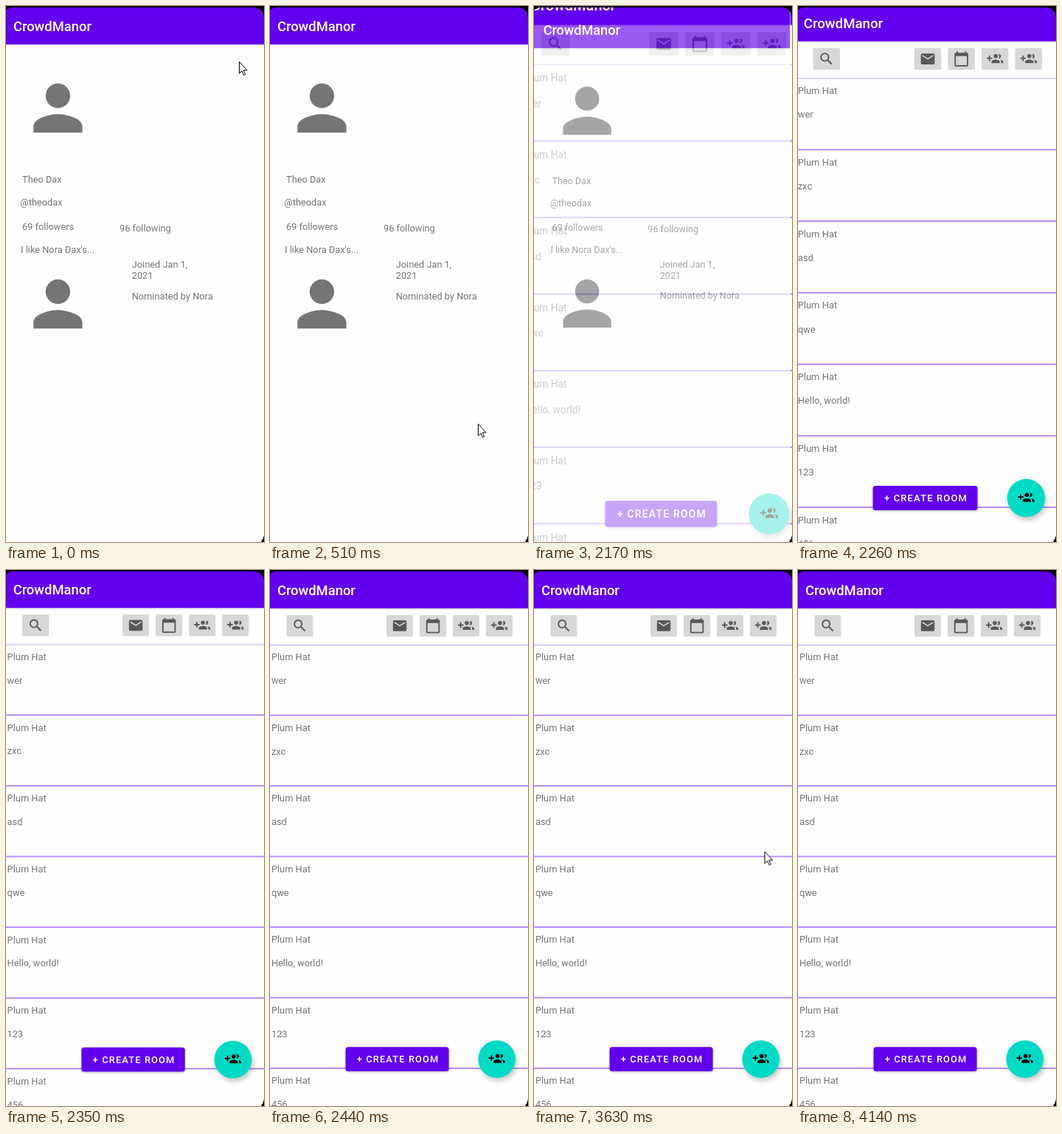
Animation, 350 px wide and 725 px high, one loop 4480 ms. Source, as an HTML page:

```html
<!DOCTYPE html>
<html lang="en">
<head>
<meta charset="utf-8">
<title>CrowdManor</title>
<style>
  html, body { margin: 0; width: 100%; height: 100%; overflow: hidden; background: #fefefe; }
  svg { display: block; }
  #stage { font: 12.8px Roboto, sans-serif; }
  .copy { fill: #757575; }
  .title { font-size: 18.4px; font-weight: 500; fill: #fff; }
  .button { font-weight: 500; letter-spacing: 1.15px; fill: #fff; }
  .screen { transform-origin: 175px 362px; }
  #room { filter: drop-shadow(0 1.5px 1.5px rgba(0, 0, 0, .3)); }
  #fab { filter: drop-shadow(2px 4px 3px rgba(0, 0, 0, .22)); }
</style>
</head>
<body>
<svg id="stage" width="350" height="725" viewBox="0 0 350 725">
  <defs>
    <linearGradient id="shade" x2="0" y2="1">
      <stop stop-opacity=".12"/><stop offset="1" stop-opacity="0"/>
    </linearGradient>
    <path id="person" d="M12 12a4 4 0 1 0 0-8 4 4 0 0 0 0 8zm0 2c-2.67 0-8 1.34-8 4v2h16v-2c0-2.66-5.33-4-8-4z"/>
    <g id="search">
      <circle cx="9.5" cy="9.5" r="5.5" fill="none" stroke="currentColor" stroke-width="2"/>
      <path d="M14 14l5.7 5.7" stroke="currentColor" stroke-width="2.1"/>
    </g>
    <path id="mail" d="M4 4h16a2 2 0 0 1 2 2v12a2 2 0 0 1-2 2H4a2 2 0 0 1-2-2V6a2 2 0 0 1 2-2zm16 4V6l-8 5-8-5v2l8 5z"/>
    <path id="calendar" fill-rule="evenodd" d="M20 3h-1V1h-2v2H7V1H5v2H4a2 2 0 0 0-2 2v16a2 2 0 0 0 2 2h16a2 2 0 0 0 2-2V5a2 2 0 0 0-2-2zm0 18H4V8h16z"/>
    <g id="group">
      <path d="M8 10H5V7H3v3H0v2h3v3h2v-3h3z"/>
      <circle cx="13" cy="8" r="3"/>
      <path d="M17.1 5.1a3 3 0 1 1 0 5.8 5 5 0 0 0 0-5.8z"/>
      <path d="M13 13c-2 0-6 1-6 3v2h12v-2c0-2-4-3-6-3zm6.6.2c.9.7 1.4 1.6 1.4 2.8v2h3v-2c0-1.5-2.4-2.5-4.4-2.8z"/>
    </g>
  </defs>
  <g id="list" class="screen"></g>
  <g id="profile" class="screen"></g>
  <path d="M0 0H350V14Q347 2 336 2H9Q3 2 0 6zM350 716V725H346Q349 721 350 716z"/>
  <path id="cursor" d="M.5.5V16.3L4 13l2.6 5.6 2.2-1L6.3 12h4.9z" fill="#fff" stroke="#000"/>
</svg>
<script>
const LOOP = 4480;
const TICK = 90;
const SWITCH = 2170;
const APP = 'CrowdManor';
const el = id => document.getElementById(id);

const text = (x, y, words, kind = 'copy') => `<text class="${kind}" x="${x}" y="${y}">${words}</text>`;

const icon = (name, cx, cy, scale = .92) =>
  `<use href="#${name}" transform="translate(${cx - 12 * scale} ${cy - 12 * scale}) scale(${scale})"/>`;

// The screens reach past the left and bottom edges of the stage.
const frame = () => `
  <rect x="-12" width="362" height="765" fill="#fefefe"/>
  <rect x="-12" y="52" width="362" height="3" fill="url(#shade)"/>
  <rect x="-12" width="362" height="52" fill="#6200ee"/>
  ${text(10, 34, APP, 'title')}`;

const tool = (name, cx) => `
  <rect x="${cx - 18}" y="61" width="36" height="29" rx="2" fill="#d6d7d7"/>
  <g fill="#585858" color="#585858">${icon(name, cx, 75.5)}</g>`;

const row = (message, i) => {
  const top = 101 + i * 95.45;
  const line = i
    ? `<rect y="${top - .8}" width="350" height="1.9" fill="#b588fb"/>`
    : `<rect y="${top}" width="350" height="1" fill="#c5aaf2"/>`;
  return line + text(2, top + 21.5, 'Plum Hat') + text(2, top + 53.2, message);
};

el('list').innerHTML = frame()
  + tool('search', 40.5)
  + ['mail', 'calendar', 'group', 'group'].map((name, i) => tool(name, 176 + 45 * i)).join('')
  + ['wer', 'zxc', 'asd', 'qwe', 'Hello, world!', '123', '456'].map(row).join('')
  + `<rect id="room" x="102.6" y="645.2" width="140" height="32.6" rx="3.5" fill="#6200ee"/>
     ${text(117.7, 666.3, '+ CREATE ROOM', 'button')}
     <circle id="fab" cx="307.7" cy="661.5" r="25.4" fill="#03dac5"/>${icon('group', 307.7, 661)}`;

el('profile').innerHTML = frame()
  + `<g fill="#757575">${icon('person', 70.4, 138, 4.15)}${icon('person', 70.4, 403, 4.15)}</g>`
  + text(22, 239.3, 'Theo Dax') + text(19.3, 269.7, '@theodax')
  + text(22, 303.2, '69 followers') + text(154, 305.2, '96 following')
  + text(20, 334, "I like Nora Dax's...")
  + text(170.7, 354, 'Joined Jan 1,') + text(170.7, 369, '2021')
  + text(170.7, 397, 'Nominated by Nora');

// Each pose holds until the next one.
function play(id, poses) {
  const keys = poses.map(({ at, ...style }) => ({ ...style, offset: at / LOOP, easing: 'steps(1, end)' }));
  keys.push({ ...keys.at(-1), offset: 1 });
  el(id).animate(keys, { duration: LOOP, iterations: Infinity });
}

// The list settles exponentially from slightly too large.
const settle = [0, 1, 2, 3].map(k => ({
  at: k && SWITCH + k * TICK,
  transform: `scale(${1 + .085 * .16 ** k})`
}));
play('list', settle);

play('profile', [
  { at: 0, opacity: 1, transform: 'none' },
  { at: SWITCH, opacity: .65, transform: 'scale(.984)' },
  { at: SWITCH + TICK, opacity: 0, transform: 'scale(.95)' }
]);

// Eased pointer move, sampled about once per tick; bow bends the path sideways.
function glide(start, end, [x0, y0], [x1, y1], bow = 0) {
  const count = Math.round((end - start) / TICK);
  return Array.from({ length: count + 1 }, (_, i) => {
    const p = i / count;
    const e = p * p * (3 - 2 * p);
    const x = x0 + (x1 - x0) * e + bow * Math.sin(Math.PI * e);
    const y = y0 + (y1 - y0) * e;
    return { at: start + p * (end - start), transform: `translate(${x}px, ${y}px)` };
  });
}

play('cursor', [
  ...glide(0, 600, [316, 75], [288, 686], -20),
  ...glide(690, 1020, [296, 688], [283, 726]),
  ...glide(3030, 3210, [339, 506], [341, 89]),
  ...glide(3360, 3870, [325, 61], [300, 700]),
  ...glide(3960, 4140, [306, 704], [300, 726])
]);
</script>
</body>
</html>
```
